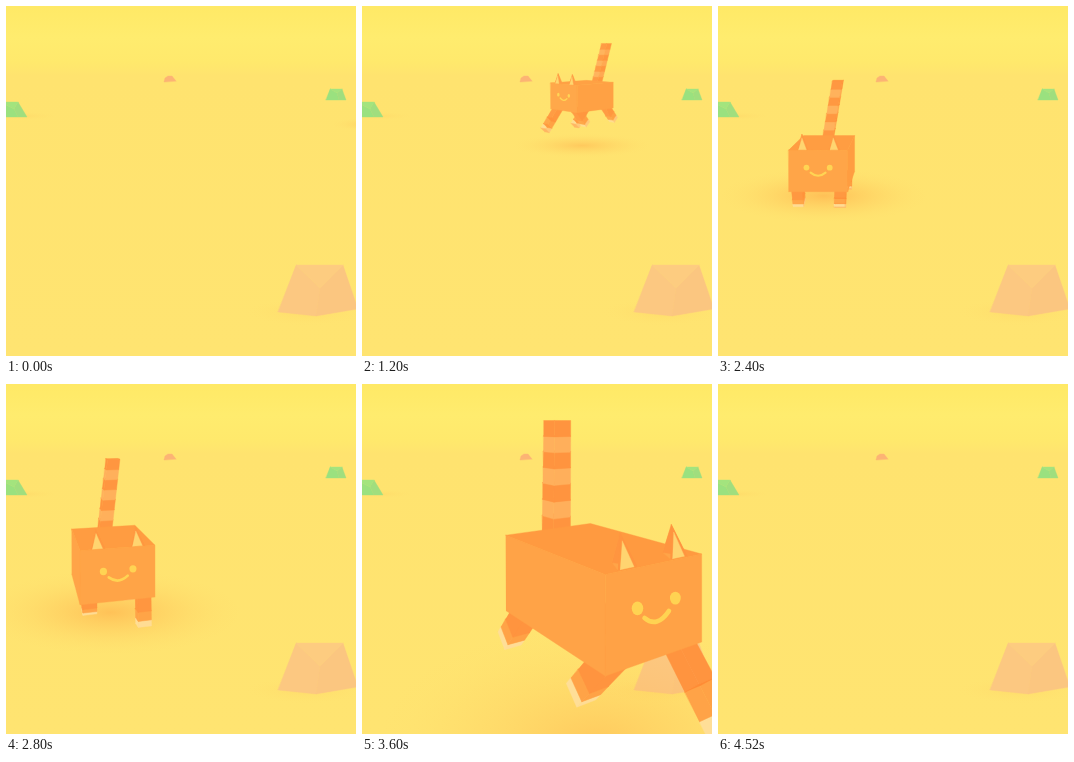
Animation of 350 by 350 pixels, one loop 4560 ms. Source, as an HTML page with a canvas:

```html
<!DOCTYPE html>
<html lang="en">
<head>
<meta charset="utf-8">
<title>Running cat</title>
<style>
html, body { margin: 0; width: 100%; height: 100%; overflow: hidden; background: #ffe471; }
canvas { display: block; width: 100vw; height: 100vh; }
</style>
</head>
<body>
<canvas id="stage" width="350" height="350"></canvas>
<script>
const ctx = document.getElementById('stage').getContext('2d');
const LOOP = 4560, STEP = 40, STRIDE = 0.96;
const FOCAL = 500, HORIZON = 38, EYE = 3.94;
const { sin, cos, max, min, PI } = Math;

const HAZE = [255, 228, 112], DEEP = [255, 128, 42], ORANGE = [255, 164, 72];
const STRIPE = [255, 178, 94], DARK = [255, 149, 64], CREAM = [255, 226, 156];
const GOLD = [255, 211, 82], GREEN = [150, 228, 128], PEACH = [253, 201, 130];

// Waypoints on the ground: seconds, sideways place, depth
const path = [
  [0, 10.1, 24.5],
  [1.2, 1.75, 19.4],
  [2, -1.38, 15.6],
  [2.8, -1.46, 10.35],
  [3.2, -0.42, 8.25],
  [3.6, 0.73, 6.15],
  [4.4, 3.9, 2.3]
];

const mix = (a, b, k) => a.map((v, i) => v + (b[i] - v) * k);
const rgb = c => `rgb(${c.map(Math.round).join()})`;

const speed = (i, c) => (path[i + 1][c] - path[i][c]) / (path[i + 1][0] - path[i][0]);

// Tangent at a waypoint, the shorter neighbour counting more
function slope(i, c) {
  if (i === 0) return speed(0, c);
  if (i === path.length - 1) return speed(i - 1, c);
  const k = (path[i][0] - path[i - 1][0]) / (path[i + 1][0] - path[i - 1][0]);
  return speed(i - 1, c) * (1 - k) + speed(i, c) * k;
}

function place(t, c) {
  let i = 0;
  while (i < path.length - 2 && t > path[i + 1][0]) i++;
  const a = path[i], b = path[i + 1], d = b[0] - a[0], u = (t - a[0]) / d;
  const ease = u * u * (3 - 2 * u);
  return a[c] + (b[c] - a[c]) * ease +
    d * u * (1 - u) * (slope(i, c) * (1 - u) - slope(i + 1, c) * u);
}

function poly(pts, color) {
  ctx.beginPath();
  pts.forEach(p => ctx.lineTo(p[0], p[1]));
  ctx.closePath();
  ctx.fillStyle = ctx.strokeStyle = rgb(color);
  ctx.lineWidth = 0.4;
  ctx.lineJoin = 'round';
  ctx.fill();
  ctx.stroke();
}

function glow(x, y, rx, ry, alpha) {
  ctx.save();
  ctx.translate(x, y);
  ctx.scale(rx, ry);
  const g = ctx.createRadialGradient(0, 0, 0, 0, 0, 1);
  for (let r = 0; r <= 1; r += 0.125)
    g.addColorStop(r, `rgba(255,172,72,${alpha * (1 - r) ** 1.7})`);
  ctx.fillStyle = g;
  ctx.fillRect(-1, -1, 2, 2);
  ctx.restore();
}

// Cut stone: flat top from l to r, corners m, bl, bm, br
function rock(color, l, r, m, bl, bm, br) {
  const shade = k => mix(color, [235, 175, 110], k);
  poly([l, m, bm, bl], shade(0.05));
  poly([r, br, bm, m], shade(0.12));
  poly([l, r, m], mix(color, HAZE, 0.12));
}

function scenery() {
  const g = ctx.createLinearGradient(0, 0, 0, 350);
  [[0, '#ffe966'], [0.09, '#ffec6e'], [0.16, '#ffe96c'], [0.2, '#ffe36f'], [1, '#ffe471']]
    .forEach(s => g.addColorStop(...s));
  ctx.fillStyle = g;
  ctx.fillRect(0, 0, 350, 350);

  glow(18, 110, 34, 4, 0.12);
  glow(300, 306, 62, 14, 0.14);
  rock(GREEN, [-6, 96], [12, 96], [8, 103], [-12, 111], [12, 111], [21, 111]);
  rock(GREEN, [324, 83], [336, 83], [331, 87], [320, 94], [333, 94], [340, 94]);
  poly([[158, 76], [159, 72], [162, 70], [166, 70], [170, 75]], [252, 180, 116]);
  rock(PEACH, [290, 259], [337, 259], [314, 282], [272, 306], [310, 310], [352, 303]);
}

// front, back, right, left, top, bottom: corner bits u + 2v + 4w, then shade
const faces = [
  [4, 5, 7, 6, 0.06], [1, 0, 2, 3, 0.3], [5, 1, 3, 7, 0.3],
  [0, 4, 6, 2, 0.04], [6, 7, 3, 2, 0.28], [0, 1, 5, 4, 0.5]
];

function cat(t) {
  const x = place(t, 1), z = place(t, 2), dt = 0.01;
  const yaw = Math.atan2(place(t + dt, 1) - place(t - dt, 1), place(t - dt, 2) - place(t + dt, 2));
  const cy = cos(yaw), sy = sin(yaw);
  const phase = 2 * PI * t / STRIDE + 0.09;
  const bounce = sin(phase) ** 2;
  const low = 0.38 + 1.07 * bounce, high = low + 1;
  const half = 0.96 + 0.05 * bounce, W = 0.71;
  const fog = max(0, min(0.2, (z - 7) * 0.008));
  const tone = c => mix(c, HAZE, fog);

  const project = ([a, y, b]) => {
    const s = FOCAL / max(0.6, z + a * sy - b * cy);
    return [175 + (x + a * cy + b * sy) * s, HORIZON + (EYE - y) * s, s];
  };

  function box(map, u, v, w, base) {
    const c = Array.from({ length: 8 }, (_, i) =>
      project(map(u[i & 1], v[i >> 1 & 1], w[i >> 2])));
    for (const f of faces) {
      const q = f.slice(0, 4).map(i => c[i]);
      const area = (q[2][0] - q[0][0]) * (q[3][1] - q[1][1]) -
        (q[3][0] - q[1][0]) * (q[2][1] - q[0][1]);
      if (area < 0) poly(q, tone(mix(base, DEEP, f[4])));
    }
  }

  // Both legs of a side swing together; a leg tucks in while it moves forward
  function leg(side, end) {
    const p = phase + 0.35 + (side > 0 ? PI : 0);
    const angle = 0.8 * sin(p), ca = cos(angle), sa = sin(angle);
    const tuck = max(0, cos(p + 0.26)) ** 2;
    const len = min(1 - 0.8 * tuck, max(0.4, low / ca));
    const map = (u, v, w) => [
      side * 0.52 + u, low + v * ca + w * sa, end * (half - 0.2) - v * sa + w * ca];
    const part = (a, b, base) => box(map, [-0.13, 0.13], [-b * len, -a * len], [-0.13, 0.13], base);
    part(0.8, 1, CREAM);
    part(0.5, 0.8, ORANGE);
    part(-0.15, 0.5, DARK);
  }

  function ear(a) {
    const b = half - 0.04, tip = [a - 0.03, high + 0.35, b - 0.08];
    const l = [a - 0.13, high, b], r = [a + 0.13, high, b], k = [a, high, b - 0.24];
    const tri = (p, c) => poly(p.map(project), tone(c));
    tri([l, k, tip], ORANGE);
    tri([k, r, tip], DARK);
    tri([l, r, tip], DARK);
    tri([[a - 0.1, high, b], [a + 0.09, high, b], [a - 0.025, high + 0.27, b - 0.05]], [255, 212, 112]);
  }

  function face() {
    const dot = (u, v) => project([u, high - v, half]);
    ctx.fillStyle = ctx.strokeStyle = rgb(tone(GOLD));
    for (const u of [-0.28, 0.28]) {
      const [px, py, s] = dot(u, 0.42);
      ctx.beginPath();
      ctx.ellipse(px, py, s * 0.07 * max(0.6, cy), s * 0.07, 0, 0, 7);
      ctx.fill();
    }
    const [l, m, r] = [-0.18, 0, 0.18].map(u => dot(u, u ? 0.54 : 0.69));
    ctx.lineWidth = m[2] * 0.05;
    ctx.lineCap = 'round';
    ctx.beginPath();
    ctx.moveTo(l[0], l[1]);
    ctx.quadraticCurveTo(m[0], m[1], r[0], r[1]);
    ctx.stroke();
  }

  const [gx, gy, gs] = project([0, 0, 0]);
  glow(gx, gy, gs * 2.7, EYE * gs * 2.3 / z, 0.7 - 0.16 * low);

  const tail = (u, v, w) => [u + v * 0.15, high + v, w - half + 0.14 - v * 0.2];
  for (let i = 0; i < 7; i++)
    box(tail, [-0.14, 0.14], [i * 0.22 - 0.03, i * 0.22 + 0.2], [-0.14, 0.14], i % 2 ? STRIPE : DARK);

  const near = yaw < 0 ? 1 : -1;
  for (const side of [-near, near]) for (const end of [-1, 1]) leg(side, end);
  box((...p) => p, [-W, W], [low, high], [-half, half], ORANGE);
  ear(-0.38);
  ear(0.38);
  face();
}

const start = performance.now();
function frame() {
  const ms = (performance.now() - start) % LOOP;
  const t = Math.floor(ms / STEP) * STEP / 1000;
  scenery();
  if (t < 4.3) cat(t);
  requestAnimationFrame(frame);
}
frame();
</script>
</body>
</html>
```
